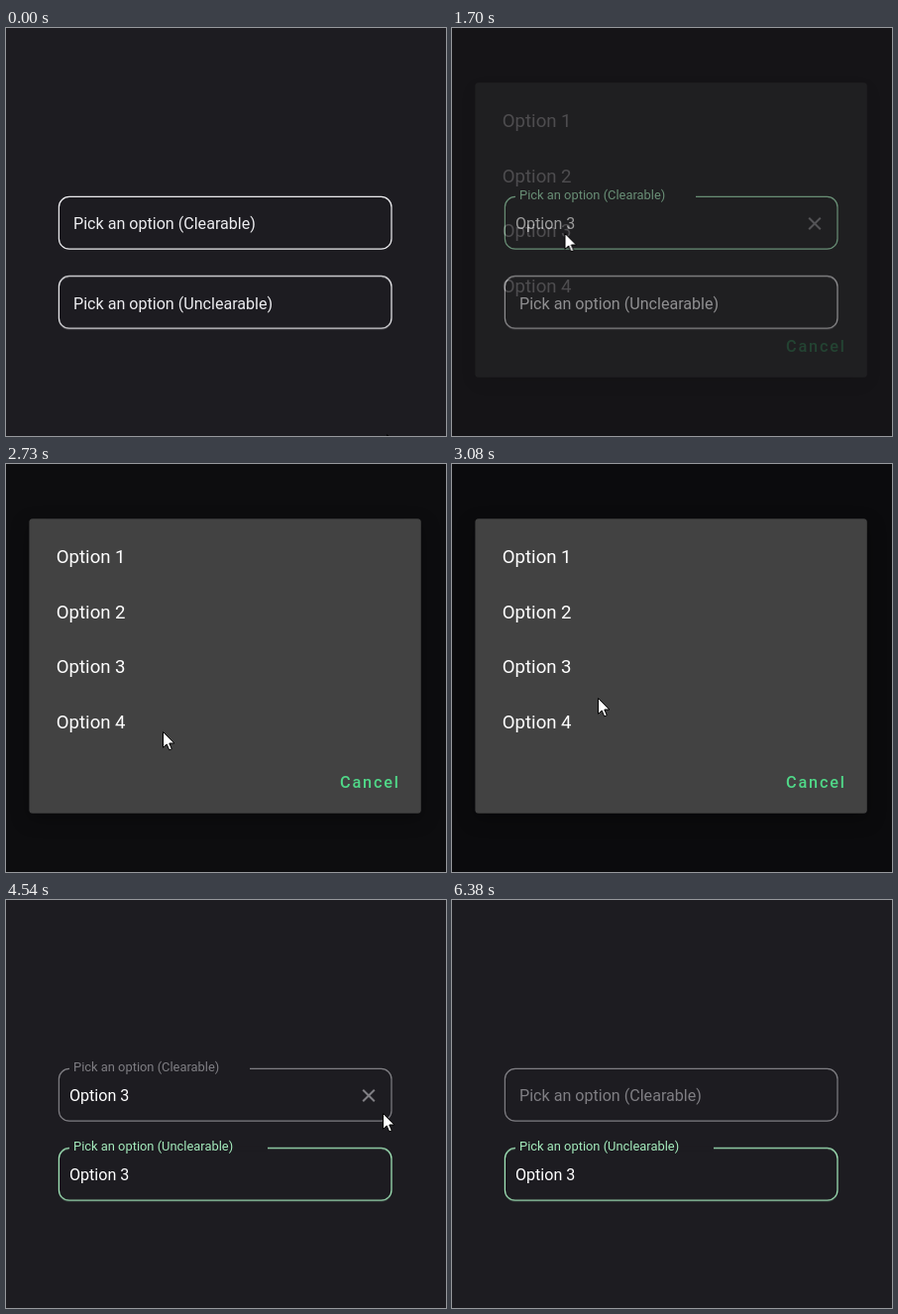
Recreate the animation shown at these times as an HTML page. Size 444 by 412 pixels, loop 6.78 s.

```html
<!DOCTYPE html>
<html lang="en">
<head>
<meta charset="utf-8">
<title>Select fields</title>
<style>
  html, body { margin: 0; width: 100%; height: 100%; overflow: hidden; background: #1d1c21; }
  svg { display: block; width: 444px; height: 412px; font: 16.1px Roboto, sans-serif; }
  .field { color: #ededf0; }
  .box { fill: none; stroke: currentColor; stroke-width: 1.2; }
  .gap { fill: #1d1c21; opacity: 0; }
  .label { fill: currentColor; transform: translate(68px, 33.4px); }
  .value { opacity: 0; fill: #fff; }
  .cross { stroke: #807f84; stroke-width: 2; }
  #scrim { opacity: 0; }
  #dialog { opacity: 0; font-size: 18.6px; fill: #fff; }
  .sheet { fill: #424242; filter: drop-shadow(0 6px 9px rgba(0, 0, 0, .3)); }
  .cancel { font-size: 16.3px; font-weight: 500; letter-spacing: 1.8px; fill: #50d888; }
  .arrow { fill: #fff; stroke: #000; stroke-width: 1; stroke-linejoin: miter; }
</style>
</head>
<body>
<svg viewBox="0 0 444 412">
  <g transform="translate(0 170)">
    <g class="field" id="first">
      <rect class="box" x="53.4" y=".4" width="335.6" height="52.8" rx="10.5"/>
      <rect class="gap" x="64" y="-2" width="182" height="5"/>
      <text class="label">Pick an option (Clearable)</text>
      <g class="value">
        <text x="64" y="33">Option 3</text>
        <path class="cross" d="M360.2 21.7l11.6 11.6m0-11.6l-11.6 11.6"/>
      </g>
    </g>
  </g>
  <g transform="translate(0 250.2)">
    <g class="field" id="second">
      <rect class="box" x="53.4" y=".4" width="335.6" height="52.8" rx="10.5"/>
      <rect class="gap" x="64" y="-2" width="200" height="5"/>
      <text class="label">Pick an option (Unclearable)</text>
      <g class="value"><text x="64" y="33">Option 3</text></g>
    </g>
  </g>
  <rect id="scrim" width="444" height="412"/>
  <g id="dialog">
    <rect class="sheet" x="23.4" y="55.3" width="395.4" height="297.5" rx="3.5"/>
    <text x="50.8" y="100">Option 1</text>
    <text x="50.8" y="155.7">Option 2</text>
    <text x="50.8" y="211.4">Option 3</text>
    <text x="50.8" y="267.1">Option 4</text>
    <text class="cancel" x="337" y="326.8">Cancel</text>
  </g>
  <g id="cursor">
    <path class="arrow" d="M.5 .5V16.4L4.2 12.9 6.7 18.8 9.3 17.7 6.8 12H11.8Z"/>
  </g>
</svg>
<script>
const LOOP = 6780;
const GREEN = '#a5ecbd', GREY = '#7f7e83', WHITE = '#ededf0';
const tracks = [];

// Keys are [ms, value]; the first and last values are held to the loop's ends.
function track(selector, prop, keys, easing = 'linear') {
  const all = [[0, keys[0][1]], ...keys, [LOOP, keys[keys.length - 1][1]]];
  const frames = all.map(([ms, v]) => ({ offset: ms / LOOP, [prop]: v, easing }));
  const anim = document.querySelector(selector).animate(frames, { duration: LOOP, fill: 'both' });
  anim.pause();
  tracks.push(anim);
}
const hard = (selector, prop, keys) => track(selector, prop, keys, 'step-end');

function floatLabel(id, up, down) {
  const low = 'translate(68px, 33.4px)', high = 'translate(68px, 3px)';
  const pos = [[up, low], [up + 130, high]];
  const size = [[up, '16.1px'], [up + 130, '12.9px']];
  const gap = [[0, 0], [up + 60, 1]];
  if (down) {
    pos.push([down - 40, high], [down + 110, low]);
    size.push([down - 40, '12.9px'], [down + 110, '16.1px']);
    gap.push([down, 0]);
  }
  track(`${id} .label`, 'transform', pos);
  track(`${id} .label`, 'fontSize', size);
  hard(`${id} .gap`, 'opacity', gap);
}

// Fade curves around an opening time and a closing time.
const sheetFade = (open, close) => [
  [open - 30, 0], [open, .15], [open + 130, .82], [open + 200, 1],
  [close - 210, 1], [close - 140, .6], [close - 70, .2], [close, .02], [close + 70, 0]];
const scrimFade = (open, close) => [
  [open - 30, 0], [open, .04], [open + 130, .26], [open + 200, .5], [open + 300, .62],
  [close - 210, .62], [close, .1], [close + 70, 0]];

floatLabel('#first', 750, 5760);
floatLabel('#second', 2460);
hard('#first', 'color', [[0, WHITE], [750, GREEN], [2460, GREY]]);
hard('#second', 'color', [[0, WHITE], [2460, GREEN]]);
hard('#first .value', 'opacity', [[0, 0], [1600, 1], [5760, 0]]);
hard('#second .value', 'opacity', [[0, 0], [3530, 1]]);
track('#dialog', 'opacity', [...sheetFade(750, 1770), ...sheetFade(2460, 3700)]);
track('#scrim', 'opacity', [...scrimFade(750, 1770), ...scrimFade(2460, 3700)]);

const path = [
  [0, 384, 410], [180, 340, 350], [320, 262, 262], [450, 205, 198], [560, 187, 180],
  [680, 193, 186], [880, 198, 191], [1150, 196, 192], [1300, 160, 200], [1450, 118, 207],
  [1770, 112, 207], [1910, 115, 210], [2050, 130, 221], [2180, 147, 248], [2320, 158, 270],
  [2800, 158, 270], [2950, 154, 256], [3080, 147, 236], [3250, 126, 216], [3400, 118, 209],
  [3700, 118, 209], [3770, 175, 222], [3840, 262, 255], [3980, 340, 325], [4080, 375, 344],
  [4250, 407, 305], [4400, 396, 245], [4540, 380, 215], [4750, 372, 201], [4950, 362, 191],
  [5230, 364, 195], [5300, 359, 190], [5430, 366, 203], [5560, 368, 205], [5690, 368, 205],
  [5900, 378, 235], [6100, 402, 310], [6300, 434, 390], [6380, 446, 414]];
track('#cursor', 'transform', path.map(([ms, x, y]) => [ms, `translate(${x}px, ${y}px)`]));

const bursts = [
  [70, 680, 9], [750, 880, 2], [950, 950, 1], [1150, 1770, 9], [1840, 2320, 8], [2460, 3080, 9],
  [3170, 3700, 7], [3770, 3840, 2], [3910, 4540, 10], [4610, 5230, 9], [5300, 5560, 5], [5760, 6380, 10]];
const ticks = [0];
for (const [a, b, n] of bursts)
  for (let i = 0; i < n; i++) ticks.push(n > 1 ? a + (b - a) * i / (n - 1) : a);

const start = performance.now();
function draw() {
  const t = (performance.now() - start) % LOOP;
  const tick = ticks.filter(ms => ms <= t + .5).pop();
  for (const anim of tracks) anim.currentTime = tick;
  requestAnimationFrame(draw);
}
draw();
</script>
</body>
</html>
```
